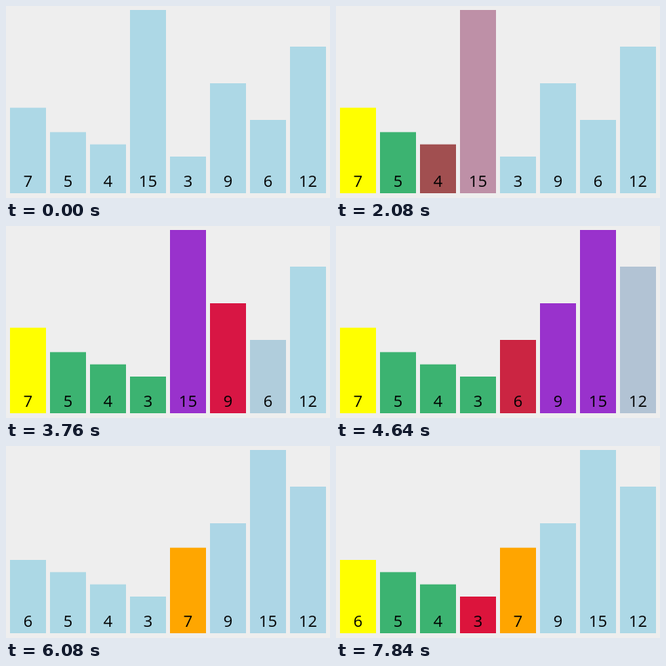
Animation of 405x241 px, one loop 8 s. Source, as an HTML page:

```html
<!DOCTYPE html>
<html lang="en">
<head>
<meta charset="utf-8">
<title>Quick sort</title>
<style>
  html, body { margin: 0; width: 100%; height: 100%; overflow: hidden; background: #eee; }
  svg { display: block; }
  text { font: 20px "Open Sans", "Noto Sans", sans-serif; text-anchor: middle; }
</style>
</head>
<body>
<svg id="stage" width="405" height="241"></svg>
<script>
const LOOP = 8000, TICK = 70, EASE_MS = 250;
const FIRST_STEP = 668, STEP_GAP = 433;
const FLOOR = 235, UNIT = 230 / 15;

const PLAIN = [173, 216, 230], PIVOT = [255, 255, 0], CURRENT = [220, 20, 60],
      LESS = [60, 179, 113], MORE = [153, 50, 204], SORTED = [255, 165, 0];

// [time of first visible tick, {bar value: new colour or new slot}]
const steps = [
  [730, {7: PIVOT}],
  [1200, {5: CURRENT}],
  [1600, {5: LESS, 4: CURRENT}],
  [2010, {4: LESS, 15: CURRENT}],
  [2480, {15: MORE, 3: CURRENT}],
  [2890, {15: 4, 3: 3}],
  [3360, {3: LESS, 9: CURRENT}],
  [3760, {9: MORE, 6: CURRENT}],
  [4170, {15: 6, 6: 4}],
  [4640, {6: LESS, 12: CURRENT}],
  [5050, {12: MORE}],
  [5460, {7: 4, 6: 0}],
  [5940, {7: SORTED, 5: PLAIN, 4: PLAIN, 15: PLAIN, 3: PLAIN, 9: PLAIN, 6: PLAIN, 12: PLAIN}],
  [6350, {6: PIVOT}],
  [6820, {5: CURRENT}],
  [7230, {5: LESS, 4: CURRENT}],
  [7700, {4: LESS, 3: CURRENT}]
];

const stage = document.getElementById("stage");

function add(parent, tag, attrs = {}) {
  const el = document.createElementNS("http://www.w3.org/2000/svg", tag);
  for (const key in attrs) el.setAttribute(key, attrs[key]);
  return parent.appendChild(el);
}

const bars = [7, 5, 4, 15, 3, 9, 6, 12].map((value, home) => {
  const group = add(stage, "g");
  const height = value * UNIT;
  const rect = add(group, "rect", {y: FLOOR - height, width: 45, height});
  add(group, "text", {x: 22.5, y: 227}).textContent = value;
  return {value, home, group, rect};
});

const mix = (a, b, k) => a + (b - a) * k;
const cubicInOut = p => p < 0.5 ? 4 * p ** 3 : 1 - 4 * (1 - p) ** 3;

// Eased progress of a step, advancing in whole ticks.
function progress(time, index) {
  const shown = steps[index][0];
  if (time < shown) return 0;
  const tick = shown + Math.floor((time - shown) / TICK) * TICK;
  const p = (tick - FIRST_STEP - STEP_GAP * index) / EASE_MS;
  return cubicInOut(Math.min(1, Math.max(0, p)));
}

function draw(now) {
  const eased = steps.map((_, i) => progress(now % LOOP, i));
  for (const {value, home, group, rect} of bars) {
    let slot = home, color = PLAIN;
    steps.forEach(([, changes], i) => {
      const next = changes[value], k = eased[i];
      if (next === undefined || k === 0) return;
      if (Array.isArray(next)) color = color.map((c, j) => mix(c, next[j], k));
      else slot = mix(slot, next, k);
    });
    group.setAttribute("transform", `translate(${5 + 50 * slot} 0)`);
    rect.setAttribute("fill", `rgb(${color.map(Math.round)})`);
  }
  requestAnimationFrame(draw);
}

draw(0);
</script>
</body>
</html>
```
